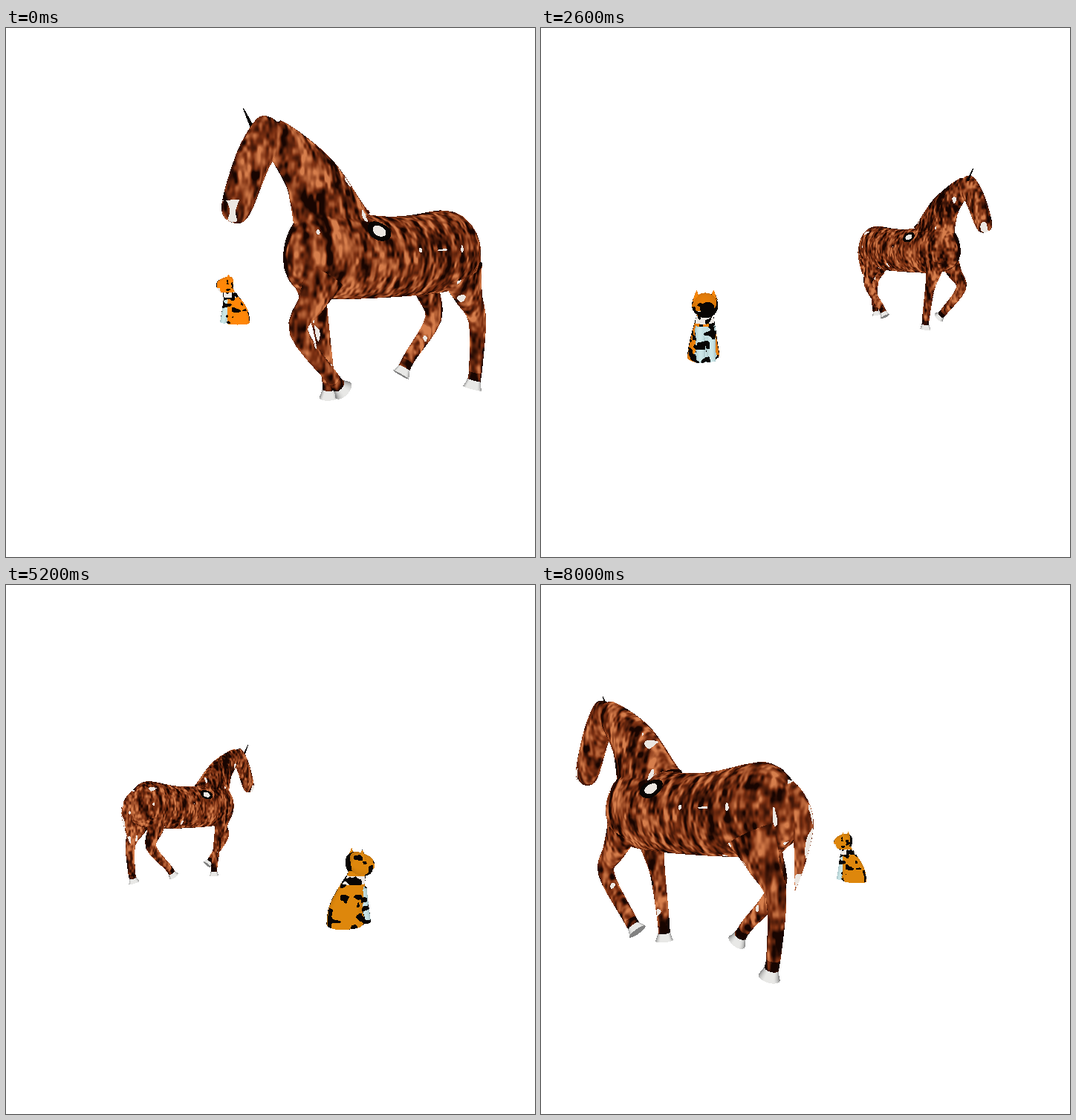
An HTML page with a canvas that plays this animation: 712x712 px, repeating every 8.1 s.

```html
<!DOCTYPE html>
<html lang="en">
<head>
<meta charset="utf-8">
<title>Horse and cat turntable</title>
<style>
html, body { margin: 0; width: 100%; height: 100%; overflow: hidden; background: #fff; }
canvas { display: block; width: 100vw; height: 100vh; }
</style>
</head>
<body>
<canvas id="stage" width="712" height="712"></canvas>
<script>
const SIZE = 712, MID = 356, HORIZON = 290, FOCAL = 570, EYE = 134;
const STEP = 100, STEPS = 81, AROUND = 22, ALONG = 28;
const ctx = document.getElementById('stage').getContext('2d');
const image = ctx.createImageData(SIZE, SIZE);
const pixels = new Uint32Array(image.data.buffer);
const depth = new Float32Array(SIZE * SIZE);

const clamp = (v, lo = 0, hi = 1) => Math.max(lo, Math.min(hi, v));
const mix = (a, b, t) => a + (b - a) * t;
const mixColor = (a, b, t) => a.map((v, i) => mix(v, b[i], clamp(t)));

// Value noise
function hash(x, y, z) {
  let h = Math.imul(x, 374761393) ^ Math.imul(y, 668265263) ^ Math.imul(z, 1440662683);
  h = Math.imul(h ^ (h >>> 13), 1274126177);
  return ((h ^ (h >>> 16)) >>> 0) / 4294967296;
}

function noise(x, y, z) {
  const ix = Math.floor(x), iy = Math.floor(y), iz = Math.floor(z);
  const ease = t => t * t * (3 - 2 * t);
  const u = ease(x - ix), v = ease(y - iy), w = ease(z - iz);
  const edge = (j, k) => mix(hash(ix, iy + j, iz + k), hash(ix + 1, iy + j, iz + k), u);
  return mix(mix(edge(0, 0), edge(1, 0), v), mix(edge(0, 1), edge(1, 1), v), w);
}

// Smooth curve through a few [forward, height] points
function curve(points) {
  const last = points.length - 1, at = k => points[clamp(k, 0, last)];
  return t => {
    const k = Math.min(Math.floor(t * last), last - 1), f = t * last - k;
    return [0, 1].map(c => {
      const [p, q, r, s] = [-1, 0, 1, 2].map(d => at(k + d)[c]);
      return 0.5 * (2 * q + (r - p) * f + (2 * p - 5 * q + 4 * r - s) * f * f
        + (3 * q - p - 3 * r + s) * f * f * f);
    });
  };
}

// Rounds off both ends of a tube
const cap = (t, power = 6) => Math.sqrt(Math.max(0, 1 - Math.abs(2 * t - 1) ** power));

// A tube along path(t), with thickness and width given by functions of t
function tube(kind, path, thick, wide, side = 0) {
  const rows = [];
  for (let j = 0; j <= ALONG; j++) {
    const t = (1 - Math.cos(Math.PI * j / ALONG)) / 2;
    const [a, h] = path(t), [a0, h0] = path(Math.max(t - 0.01, 0)), [a1, h1] = path(Math.min(t + 0.01, 1));
    const len = Math.hypot(a1 - a0, h1 - h0), na = (h0 - h1) / len, nh = (a1 - a0) / len;
    const r = Math.max(thick(t), 0.4), w = Math.max(wide(t), 0.4), row = [];
    for (let s = 0; s <= AROUND; s++) {
      const angle = s / AROUND * 2 * Math.PI, c = Math.cos(angle), d = Math.sin(angle);
      const n = Math.hypot(c / r, d / w);
      row.push({
        a: a + na * c * r, h: h + nh * c * r, w: side + d * w,
        na: na * c / r / n, nh: nh * c / r / n, nw: d / w / n, u: t
      });
    }
    rows.push(row);
  }
  return { kind, rows };
}

function horseLeg(side, bulk, ...points) {
  const thick = u => 5.2 + bulk * (1 - u) ** 2.6 + 3.5 * clamp((u - 0.84) / 0.16);
  return tube('leg', curve(points), thick, u => 2 + 0.6 * thick(u), side);
}

function horseBody() {
  const bend = t => (2 * t - 1) ** 2;
  return tube('body', t => [97 * (2 * t - 1), 122 + 12 * bend(t)],
    t => (36 + 9 * bend(t)) * cap(t), t => (34 - 3 * t) * cap(t));
}

const horseParts = [
  horseBody(),
  tube('neck', curve([[55, 146], [76, 188], [112, 223]]), t => 37 - 26 * t, t => 22 - 13 * t),
  tube('head', curve([[107, 228], [126, 200], [144, 150]]),
    t => (16 - 4 * t) * cap(t), t => (11.5 - 1.5 * t) * cap(t)),
  tube('ear', curve([[122, 224], [131, 241]]), t => 2 - 1.8 * t, t => 2 - 1.8 * t, 11),
  tube('tail', curve([[-88, 150], [-102, 122], [-101, 92], [-96, 64]]),
    t => 8.5 * Math.sin(Math.PI * t ** 0.6), t => 8 * Math.sin(Math.PI * t ** 0.6)),
  horseLeg(-18, 18, [-68, 108], [-78, 86], [-89, 62], [-87, 18], [-83, 0]),
  horseLeg(17, 18, [-66, 108], [-62, 90], [-70, 60], [-40, 24], [-30, 9]),
  horseLeg(14, 13, [70, 108], [65, 85], [59, 62], [52, 18], [51, 0]),
  horseLeg(-15, 13, [72, 108], [84, 88], [95, 66], [66, 28], [55, 16])
];

const catBodyThick = t => (9 + 14.5 * Math.cos(t * Math.PI / 2) ** 1.6) * Math.sqrt(clamp(0.6 + t * 6));
const catParts = [
  tube('body', curve([[-6, 2], [-6, 20], [4, 46], [12, 64]]), catBodyThick, t => 2.5 + 0.72 * catBodyThick(t)),
  tube('head', curve([[0, 70], [13, 70], [29, 65]]),
    t => (15 - 5 * t * t) * cap(t, 4), t => (16 - 5 * t * t) * cap(t, 4))
];
for (const s of [-1, 1]) {
  catParts.push(
    tube('ear', curve([[9, 76], [9, 88]]), t => 5 * (1 - t), t => 5 * (1 - t), s * 10),
    tube('leg', curve([[10, 44], [14, 22], [18, 4]]), t => 7 - 2 * t, t => 6 - t, s * 6));
}

const BLACK = [8, 5, 4], DARK = [24, 5, 1], BROWN = [124, 48, 18], TAN = [214, 126, 76], WHITE = [236, 231, 226];

function paintHorse(kind, a, h, w, u, face) {
  if (kind === 'ear') return BLACK;
  if (kind === 'leg' && u > 0.86) return mixColor([130, 130, 130], [232, 232, 230], face * 1.3);
  if (kind === 'body') {
    const d = Math.hypot((a - 28) * 0.7, h - 144);
    if (Math.abs(w) > 6 && d < 8) return d < 4.5 ? WHITE : BLACK;
  }
  const patch = noise(a * 0.11 + 40, h * 0.07, w * 0.09 + 9);
  const limit = kind === 'tail' ? 0.7 : kind === 'head' && h < 166 ? 0.6 : 0.88;
  if (patch > limit && face > 0.2) return WHITE;
  let v = 0.55 * noise(a * 0.2, h * 0.06, w * 0.08) + 0.45 * noise(a * 0.42, h * 0.2, w * 0.25);
  v = (v - 0.5) * 2.1 + 0.48;
  if (kind === 'neck' && w > 2 && a < 60 + (h - 150) * 0.45) v -= 0.3;
  if (kind === 'leg' && u > 0.78) v -= 0.35;
  v -= Math.max(0, 0.25 - face);
  return v < 0.5 ? mixColor(DARK, BROWN, v * 2) : mixColor(BROWN, TAN, v * 2 - 1);
}

function paintCat(kind, a, h, w, u, face, step) {
  if (face < 0.08) return BLACK;
  const spot = noise(a * 0.11 + 5, h * 0.19, w * 0.11 + 3);
  if (kind === 'leg' || (kind === 'body' && a > 9 && h < 46)) {
    return spot > 0.62 ? BLACK : mixColor([150, 180, 184], [205, 232, 234], face);
  }
  if (kind === 'body' && h > 49 && h < 58) {
    return noise(a * 0.2, h * 0.1, w * 0.2) > 0.54 ? WHITE : BLACK;
  }
  if (kind === 'head') {
    if (Math.hypot(a - 22, h - 72, Math.abs(w) - 6) < 3.2 || a > 28) return BLACK;
    if (a > 22 && h < 66) return WHITE;
  }
  if (spot > (kind === 'body' ? 0.66 : 0.72)) return BLACK;
  const orange = mixColor([255, 135, 8], [222, 135, 12], (step - 20) / 26);
  return mixColor(BLACK, orange, 0.82 + face * 0.25);
}

// Angles in degrees, rates in degrees per step
const actors = [
  { parts: horseParts, paint: paintHorse, size: 1, radius: 220,
    angle: 152, rate: 3.83, heading: -113, spin: 3.9, sway: 9 },
  { parts: catParts, paint: paintCat, size: 0.93, radius: 146,
    angle: -25, rate: 3.81, heading: -90, spin: 4.1, sway: 14 }
];

function poseAt(actor, step) {
  const p = step / (STEPS - 1), sway = -actor.sway * p * Math.sin(2 * Math.PI * p);
  const orbit = (actor.angle - actor.rate * step + sway) * Math.PI / 180;
  const yaw = (actor.heading - actor.spin * step + sway) * Math.PI / 180;
  return {
    x: actor.radius * Math.sin(orbit), z: FOCAL + actor.radius * Math.cos(orbit),
    sin: Math.sin(yaw), cos: Math.cos(yaw), size: actor.size
  };
}

function project(v, pose) {
  const { sin, cos, size } = pose;
  const x = pose.x + size * (v.a * sin + v.w * cos);
  const z = pose.z + size * (v.a * cos - v.w * sin);
  const drop = EYE - size * v.h;
  const nx = v.na * sin + v.nw * cos, nz = v.na * cos - v.nw * sin;
  const face = (v.nh * drop - nx * x - nz * z) / Math.hypot(x, drop, z);
  return {
    x: MID + x * FOCAL / z, y: HORIZON + drop * FOCAL / z, near: 1 / z,
    a: v.a, h: v.h, w: v.w, u: v.u, face
  };
}

function triangle(A, B, C, paint) {
  const area = (B.x - A.x) * (C.y - A.y) - (B.y - A.y) * (C.x - A.x);
  if (Math.abs(area) < 1e-6) return;
  const from = (...v) => Math.max(0, Math.ceil(Math.min(...v) - 0.5));
  const to = (...v) => Math.min(SIZE - 1, Math.floor(Math.max(...v) - 0.5));
  const x0 = from(A.x, B.x, C.x), x1 = to(A.x, B.x, C.x);
  const y0 = from(A.y, B.y, C.y), y1 = to(A.y, B.y, C.y);
  for (let y = y0; y <= y1; y++) {
    for (let x = x0; x <= x1; x++) {
      const px = x + 0.5 - A.x, py = y + 0.5 - A.y;
      const b = (px * (C.y - A.y) - py * (C.x - A.x)) / area;
      const c = ((B.x - A.x) * py - (B.y - A.y) * px) / area;
      const a = 1 - b - c;
      if (a < 0 || b < 0 || c < 0) continue;
      const near = a * A.near + b * B.near + c * C.near, i = y * SIZE + x;
      if (near <= depth[i]) continue;
      depth[i] = near;
      const blend = key => a * A[key] + b * B[key] + c * C[key];
      const [red, green, blue] = paint(blend('a'), blend('h'), blend('w'), blend('u'), blend('face'));
      pixels[i] = (255 << 24 | blue << 16 | green << 8 | red) >>> 0;
    }
  }
}

function drawActor(actor, step) {
  const pose = poseAt(actor, step);
  for (const { kind, rows } of actor.parts) {
    const grid = rows.map(row => row.map(v => project(v, pose)));
    const paint = (a, h, w, u, face) => actor.paint(kind, a, h, w, u, face, step);
    for (let j = 1; j < grid.length; j++) {
      for (let s = 1; s <= AROUND; s++) {
        const p = grid[j - 1][s - 1], q = grid[j - 1][s], r = grid[j][s], t = grid[j][s - 1];
        triangle(p, q, r, paint);
        triangle(p, r, t, paint);
      }
    }
  }
}

function render(step) {
  pixels.fill(0xffffffff);
  depth.fill(0);
  for (const actor of actors) drawActor(actor, step);
  ctx.putImageData(image, 0, 0);
}

const start = performance.now();
let shown = -1;
function tick() {
  const step = Math.floor((performance.now() - start) / STEP) % STEPS;
  if (step !== shown) render(shown = step);
  requestAnimationFrame(tick);
}
tick();
</script>
</body>
</html>
```
